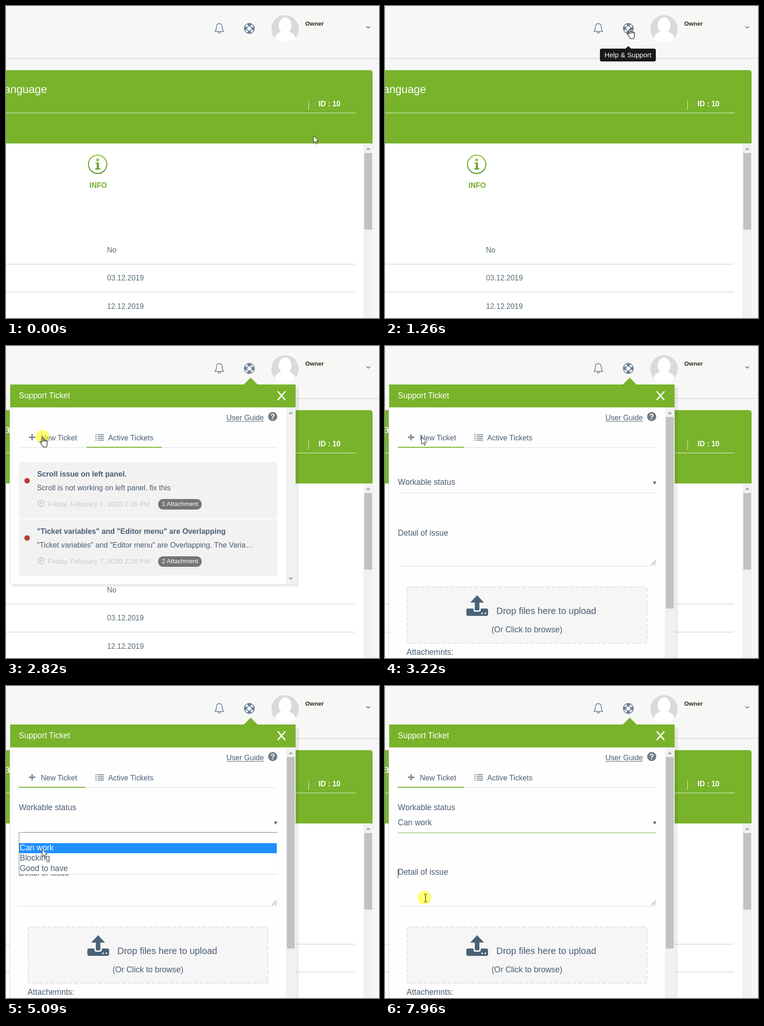
These frames come from a looping animation (814 px wide and 681 px high, 8 s). An HTML page:

```html
<!DOCTYPE html>
<html lang="en">
<head>
<meta charset="utf-8">
<title>Support ticket</title>
<style>
html, body { margin: 0; width: 100%; height: 100%; overflow: hidden; background: #f6f6f6 }
svg { display: block; width: 814px; height: 681px; font: 16px "Liberation Sans", Arial, sans-serif }
.panel { font-size: 16.2px; fill: #4a5d72 }
.big { font-size: 17.5px }
.bold { font-weight: bold }
.pale { font-size: 15px; fill: #c9c9c9 }
.badge { font-size: 13.6px; fill: #fff }
.line { fill: none; stroke: #dcdcdc }

/* 1% = 80 ms */
.step, .ease { animation: 8s step-end infinite }
.ease { animation-timing-function: linear }
#tip { animation-name: tip }
#panel { animation-name: panel }
#list { animation-name: list }
#form { animation-name: form }
#fields { animation-name: fields }
#status { animation-name: status }
#menu { animation-name: menu }
#blank { animation-name: blank }
#canWork { animation-name: canWork }
#canWorkText { animation-name: canWorkText }
#chosen { animation-name: chosen }
#detail { animation-name: detail }
#caret { animation-name: caret }
#pointer { animation-name: move }
#click { animation-name: click }
#arrow { animation-name: arrow }
#hand { animation-name: hand }
#beam { animation-name: beam }

@keyframes tip { 0%, 7.75% { opacity: 0 } 9.6%, 24.5% { opacity: 1 } 26.3%, 100% { opacity: 0 } }
@keyframes panel { 0% { opacity: 0 } 16.7% { opacity: 1 } }
@keyframes list { 0% { opacity: 1 } 38.2% { opacity: 0 } 100% { opacity: 0 } }
@keyframes form { 0% { opacity: 0 } 38.2% { opacity: 1 } }
@keyframes fields { 0%, 38.25% { opacity: 0 } 40.1%, 100% { opacity: 1 } }
@keyframes status { 0%, 49.9% { transform: none } 51.8%, 100% { transform: translateY(-32px) } }
@keyframes menu { 0% { opacity: 0 } 50% { opacity: 1 } 73.2% { opacity: 0 } 100% { opacity: 0 } }
@keyframes blank { 0% { opacity: 1 } 63% { opacity: 0 } 100% { opacity: 0 } }
@keyframes canWork { 0% { opacity: 0 } 63% { opacity: 1 } }
@keyframes canWorkText { 0% { fill: #4a5d72 } 63% { fill: #fff } 100% { fill: #fff } }
@keyframes chosen { 0% { opacity: 0 } 73.2% { opacity: 1 } }
@keyframes detail { 0% { transform: none } 99.4% { transform: translateY(-2px) } 100% { transform: translateY(-2px) } }
@keyframes caret { 0% { opacity: 0 } 99.4% { opacity: 1 } }
@keyframes move {
  0%, .4% { transform: translate(670.5px, 282.5px); animation-timing-function: ease-in-out }
  7%, 23.1% { transform: translate(534px, 49px) }
  26.5% { transform: translate(330px, 150px) }
  28.5% { transform: translate(180px, 212px) }
  29.5% { transform: translate(120px, 216px) }
  32%, 41.5% { transform: translate(79.5px, 198px) }
  43.75%, 60.5% { transform: translate(95px, 295px) }
  60.6%, 62.3% { transform: translate(71px, 319px) }
  63.5%, 77.5% { transform: translate(78.5px, 355.5px) }
  81%, 83.9% { transform: translate(84px, 446px) }
  83.95%, 84.6% { transform: translate(79.5px, 373.5px) }
  87% { transform: translate(82px, 332px) }
  91.6%, 100% { transform: translate(86px, 462px) }
}
@keyframes click {
  0% { opacity: 0 } 14.8% { opacity: 1 } 15.65% { opacity: 0 }
  35.2% { opacity: 1 } 37.3% { opacity: 0 } 49% { opacity: 1 } 49.9% { opacity: 0 }
  71.3% { opacity: 1 } 73.2% { opacity: 0 } 99.4% { opacity: 1 } 100% { opacity: 1 }
}
@keyframes arrow {
  0% { opacity: 1 } 6.5% { opacity: 0 } 23.5% { opacity: 1 } 30.5% { opacity: 0 } 40.1% { opacity: 1 }
  50% { opacity: 0 } 53.7% { opacity: 1 } 80% { opacity: 0 } 83.95% { opacity: 1 } 89.5% { opacity: 0 } 100% { opacity: 0 }
}
@keyframes hand {
  0% { opacity: 0 } 6.5% { opacity: 1 } 23.5% { opacity: 0 } 30.5% { opacity: 1 } 40.1% { opacity: 0 } 100% { opacity: 0 }
}
@keyframes beam { 0% { opacity: 0 } 80% { opacity: 1 } 83.95% { opacity: 0 } 89.5% { opacity: 1 } 100% { opacity: 1 } }
</style>
</head>
<body>
<svg viewBox="0 0 814 681" xmlns="http://www.w3.org/2000/svg">
  <defs>
    <linearGradient id="leaf" x1="0" y1="325" x2="0" y2="366" gradientUnits="userSpaceOnUse">
      <stop stop-color="#95c83f"/><stop offset="1" stop-color="#57962a"/>
    </linearGradient>
    <clipPath id="face"><circle cx="609" cy="50" r="30"/></clipPath>
    <g id="ticket">
      <rect x="28" y="253" width="564" height="123" fill="#f2f2f2"/>
      <circle cx="46" cy="294" r="6" fill="#be3a34"/>
      <g fill="none" stroke="#c9c9c9" stroke-width="2">
        <circle cx="76.500" cy="343.500" r="6.800"/><path d="M77 339.500V344.500H73"/>
      </g>
      <text class="pale" x="91" y="350">Friday, February 7, 2020 2:26 PM</text>
      <rect x="332" y="334" width="95" height="23" rx="11" fill="#757575"/>
    </g>
  </defs>

  <!-- page -->
  <rect width="814" height="681" fill="#f6f6f6"/>
  <rect width="814" height="114" fill="#f7f7f5"/>
  <path d="M0 114.500H814" stroke="#cacaca"/>
  <g fill="none" stroke="#6d8097" stroke-width="1.700" stroke-linejoin="round">
    <path d="M465.500 37V38.500M456 55.500C458.500 53 459 50 459 46C459 41 461.500 38.500 465.500 38.500S472 41 472 46C472 50 472.500 53 475 55.500ZM462.500 56C463 60 468 60 468.500 56"/>
  </g>
  <g fill="none" stroke="#6d8097">
    <circle cx="531" cy="49" r="8.300" stroke="#f4f5f6" stroke-width="6"/>
    <circle cx="531" cy="49" r="8.300" stroke-width="6" stroke-dasharray="7.200 5.837" stroke-dashoffset="3.600"/>
    <circle cx="531" cy="49" r="10.900" stroke-width="1.500"/>
    <circle cx="531" cy="49" r="5.500" stroke-width="1.500"/>
  </g>
  <circle cx="609" cy="50" r="30" fill="#dadada"/>
  <g clip-path="url(#face)" fill="#fff">
    <ellipse cx="609" cy="42.500" rx="14" ry="17.500"/><ellipse cx="609" cy="73" rx="23" ry="18"/>
  </g>
  <text class="bold" x="653" y="43" font-size="13" fill="#2d2d1c">Owner</text>
  <path d="M786.500 44.500L790.500 48.500L794.500 44.500" fill="none" stroke="#444" stroke-width="1.200"/>

  <path d="M0 140H794Q800 140 800 146V300H0Z" fill="#78b32b"/>
  <g fill="#fff">
    <text x="89.500" y="190" font-size="24" text-anchor="end">Language</text>
    <text class="bold" x="682" y="219">ID : 10</text>
  </g>
  <path d="M660.500 207V226M0 233.500H763" stroke="#eef5e2"/>
  <rect y="300" width="780" height="381" fill="#fff"/>
  <rect x="780" y="300" width="20" height="381" fill="#f1f1f1"/>
  <rect x="782" y="321" width="17" height="167" fill="#c1c1c1"/>
  <path d="M785.500 314L790.500 309L795.500 314Z" fill="#a3a3a3"/>
  <circle cx="200" cy="345.500" r="20" fill="#fff" stroke="url(#leaf)" stroke-width="2.300"/>
  <g fill="url(#leaf)">
    <circle cx="200" cy="336" r="2.900"/><path d="M195.500 341.500H203V354H205.500V357H195V354H198V344.500H195.500Z"/>
  </g>
  <text class="bold" x="182" y="397" fill="#76b02c">INFO</text>
  <g fill="#586b75">
    <text x="220.500" y="538">No</text><text x="220.500" y="599">03.12.2019</text><text x="220.500" y="661">12.12.2019</text>
  </g>
  <path d="M0 563.500H761M0 624.500H761" stroke="#c8c8c8"/>

  <!-- support panel -->
  <g id="panel" class="panel step">
    <g id="list" class="step">
      <path d="M632 90H639V526H14V520H632Z" fill="#000" opacity=".065"/>
      <path d="M8 84H632V520H12Q8 520 8 516Z" fill="#fefefe"/>
      <path class="line" d="M8.500 134V516Q8.500 520.500 12 520.500H632" stroke="#e9e9e9"/>
      <rect x="611" y="134" width="21" height="386" fill="#f1f1f1"/>
      <path d="M616.500 505.500H626.500L621.500 510.500Z" fill="#a3a3a3"/>
      <use href="#ticket"/><use href="#ticket" y="125"/>
      <text class="bold" x="68" y="285">Scroll issue on left panel.</text>
      <text x="67.500" y="315">Scroll is not working on left panel. fix this</text>
      <text class="bold" x="67.500" y="410">"Ticket variables" and "Editor menu" are Overlapping</text>
      <text x="67.500" y="440">"Ticket variables" and "Editor menu" are Overlapping. The Varia…</text>
      <text class="badge" x="340" y="349">1 Attachment</text>
      <text class="badge" x="340" y="474">2 Attachment</text>
      <path class="line" d="M28 221.500H592"/>
      <rect x="176" y="220" width="164" height="2" fill="#78b32b"/>
    </g>

    <g id="form" class="step">
      <rect x="632" y="90" width="7" height="591" opacity=".065" fill="#000"/>
      <rect x="8" y="84" width="624" height="597" fill="#fefefe"/>
      <path class="line" d="M8.500 134V681" stroke="#e9e9e9"/>
      <rect x="611" y="134" width="21" height="547" fill="#f1f1f1"/>
      <rect x="613" y="155" width="17" height="418" fill="#c1c1c1"/>
      <path class="line" d="M28 221.500H592"/>
      <rect x="28" y="220" width="145" height="2" fill="#78b32b"/>
      <g id="fields" class="big ease">
        <text id="status" class="ease" x="28" y="303">Workable status</text>
        <path d="M585 296H592L588.500 302.500Z"/>
        <path class="line" d="M28 320.500H592M28 480.500H592"/>
        <g id="chosen" class="step">
          <text x="28" y="304">Can work</text>
          <path d="M28 320.500H592" stroke="#78b32b"/>
        </g>
        <text id="detail" class="step" x="28" y="414">Detail of issue</text>
        <path id="caret" class="step" d="M28.500 400V420" stroke="#333"/>
        <path d="M581 478L591 468M587 478L591 474" stroke="#555"/>
        <rect x="48.500" y="526.500" width="523" height="122" rx="3" fill="#f6f6f6" stroke="#e9e9e9" stroke-width="3" stroke-dasharray="9 4"/>
        <path d="M201 544L216 560H206V575Q206 577 204 577H198Q196 577 196 575V560H186Z" fill="#4a6277"/>
        <path d="M181 573H193V576Q193 580 197 580H205Q209 580 209 576V573H221Q225 573 225 577V585Q225 589 221 589H181Q177.500 589 177.500 585V577Q177.500 573 181 573Z" fill="#4a6277"/>
        <circle cx="212" cy="583.500" r="1.800" fill="#f6f6f6"/><circle cx="219" cy="583.500" r="1.800" fill="#f6f6f6"/>
        <text x="243" y="585" font-size="20">Drop files here to upload</text>
        <text x="232.500" y="625">(Or Click to browse)</text>
        <text x="47" y="674">Attachemnts:</text>
        <g id="menu" class="step">
          <rect x="28" y="319" width="564" height="92" fill="#fff"/>
          <path class="line" d="M29 410.500H591"/>
          <path d="M28.500 411V319.500H592" fill="none" stroke="#7b7b7b"/>
          <rect id="blank" class="step" x="30" y="321" width="561" height="22" fill="#1e90ff"/>
          <rect id="canWork" class="step" x="29" y="343" width="562" height="22" fill="#1e90ff"/>
          <text id="canWorkText" class="step" x="30" y="359">Can work</text>
          <text x="30" y="381">Blocking</text>
          <text x="30" y="404">Good to have</text>
        </g>
      </g>
    </g>

    <path d="M9 84H519L534 69L549 84H632V134H9Z" fill="#78b32b"/>
    <text class="big" x="28" y="114" fill="#fff">Support Ticket</text>
    <path d="M593 99L609.500 118M609.500 99L593 118" stroke="#fff" stroke-width="2.800"/>
    <path d="M616.500 148.500H626.500L621.500 143.500Z" fill="#a3a3a3"/>
    <text x="481" y="162">User Guide</text>
    <path d="M481 164.500H563" stroke="#4a5d72"/>
    <circle cx="582" cy="154" r="10" fill="#707c85"/>
    <text class="bold" x="582" y="160" text-anchor="middle" fill="#fff">?</text>
    <path d="M57 192.500V206M50 199.200H64" stroke="#838e96" stroke-width="3.400"/>
    <path d="M195 193.500H198M195 197.500H198M195 201.500H198M195 205.500H198M200 193.500H214M200 197.500H214M200 201.500H214M200 205.500H214" stroke="#838e96" stroke-width="2.200"/>
    <text x="76" y="206">New Ticket</text>
    <text x="223" y="206">Active Tickets</text>
  </g>

  <g id="tip" class="ease">
    <path d="M525 93L531 87.500L537 93Z" fill="#191919"/>
    <rect x="469" y="93" width="122" height="28" rx="4" fill="#191919"/>
    <text x="479" y="112" font-size="15.100" fill="#fff">Help &amp; Support</text>
  </g>

  <g id="pointer" class="ease">
    <circle id="click" class="step" r="15" fill="#ff0" fill-opacity=".55"/>
    <g fill="#fff" stroke="#111" stroke-linejoin="round">
      <path id="arrow" class="step" d="M.5 .5V16.500L4.200 13.200L6.700 18.800L9 17.800L6.600 12.200H11.500Z"/>
      <g id="hand" class="step">
        <path d="M-1 12V2.500a1.600 1.600 0 0 1 3 0V8c0-1.500 3-1.500 3 .3 0-1.200 3-1.200 3 .6 0-1 2.500-1 2.500 .8V15c0 3-1.500 4-1.500 7.500H1.500C1 19-3 16-5 12.500-6 10.800-4 9.500-2.700 10.800Z" stroke-width="1.200"/>
        <path d="M2 8V11.500M5 8.500V11.500M8 9V11.500"/>
      </g>
      <path id="beam" class="step" d="M-1 -7.500H1.500L2.500 -6.500L3.500 -7.500H6M2.500 -6.500V8M-1 9H1.500L2.500 8L3.500 9H6" fill="none"/>
    </g>
  </g>
</svg>
</body>
</html>
```
